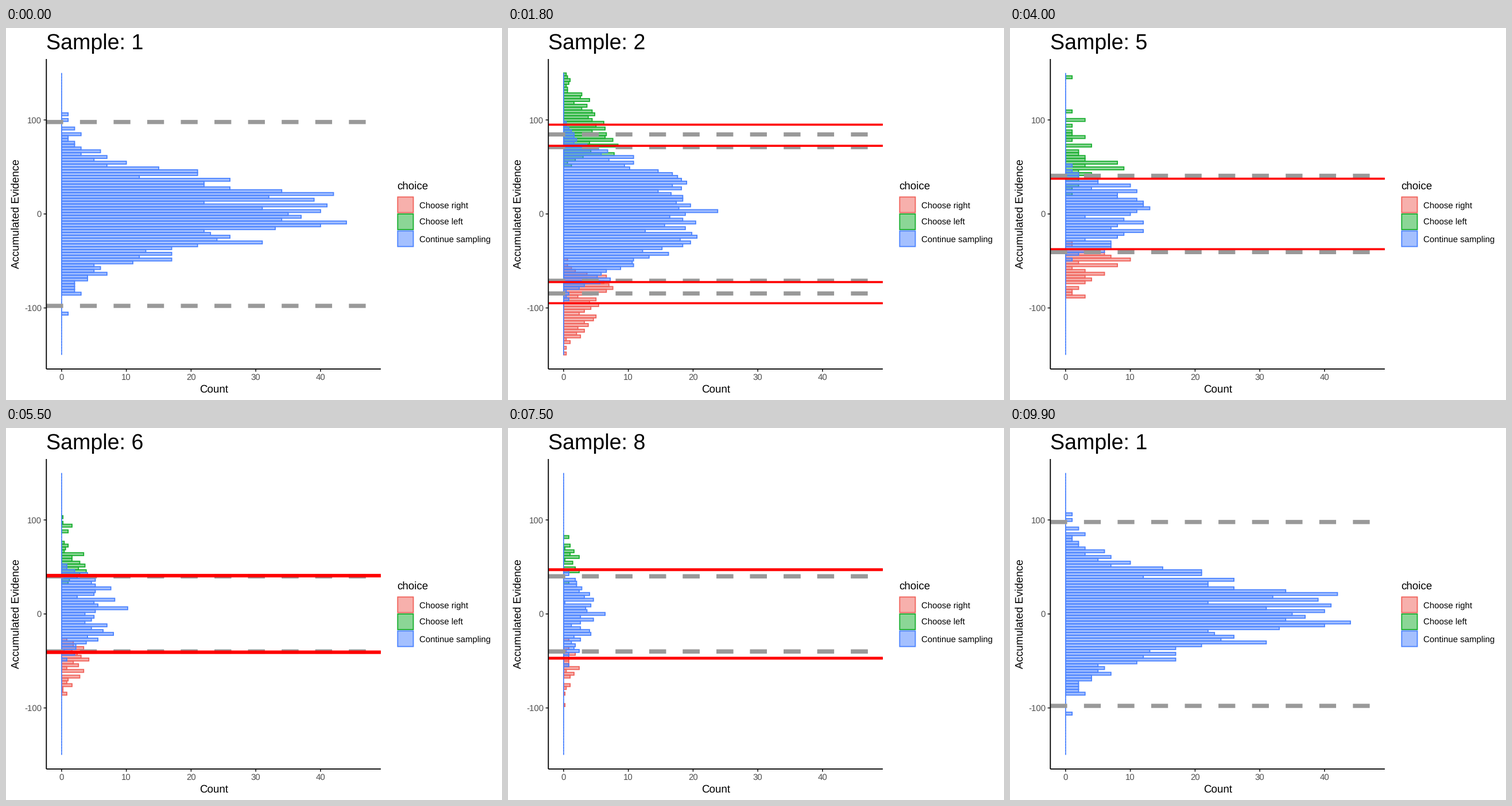
Write a matplotlib script that moves like this. It is 864 px wide and 648 px high and loops after 10 s.

```python
import numpy as np
import matplotlib
import matplotlib.pyplot as plt
from matplotlib.animation import FuncAnimation
from matplotlib.collections import PolyCollection
from matplotlib.colors import to_rgba
from matplotlib.patches import Rectangle

matplotlib.rcParams["font.family"] = "Liberation Sans"
matplotlib.rcParams["text.hinting"] = "none"
matplotlib.rcParams["path.snap"] = False

W, H, DPI = 864, 648, 100
PT = 72 / DPI                       # points per pixel
LEFT, RIGHT, TOP, BOTTOM = 70.3, 652.9, 54, 594
X0, X_UNIT = 96.9, 11.275
Y0, Y_UNIT = 323.9, 1.637
THIN = 1.82

COLORS = {"right": "#F0625A", "left": "#18AE2F", "stay": "#4B83FF"}
LABELS = {"right": "Choose right", "left": "Choose left",
          "stay": "Continue sampling"}

# Evidence model: every trial has its own drift and adds noise per sample.
SAMPLES, TRIALS = 10, 1000
DRIFT_SD, NOISE_SD, BOUND_SD = 22, 23, 8
LIMIT, BINS, MAX_COUNT = 150, 99, 47
EDGES = np.linspace(-LIMIT, LIMIT, BINS + 1)

# Collapsing bound (Weibull shape) and the fitted bound, undefined at first.
GREY = [40 + 60 * np.exp(-(n / 3) ** 3) for n in range(1, SAMPLES + 1)]
RED = [None, 95, 57.5, 45, 37.5, 40, 47.5, 47.5, 43.5, 42.5]

STARTS = [6 + 10 * i - (i > 4) for i in range(SAMPLES)]
TWEEN = 5


def histogram(values):
    return np.minimum(np.histogram(values, EDGES)[0], MAX_COUNT)


def simulate(seed):
    """Histograms of the trials that stop or go on, one dict per sample."""
    rng = np.random.default_rng(seed)
    drift = rng.normal(0, DRIFT_SD, TRIALS)
    x = np.zeros(TRIALS)
    states = []
    for n, bound in enumerate(GREY):
        x = x + drift + rng.normal(0, NOISE_SD, len(x))
        if n == 0:
            states.append({"stay": histogram(x)})
            continue
        go = np.abs(x) < bound + rng.normal(0, BOUND_SD, len(x))
        states.append({"left": histogram(x[~go & (x > 0)]),
                       "right": histogram(x[~go & (x < 0)]),
                       "stay": histogram(x[go])})
        x, drift = x[go], drift[go]
    return states


states = simulate(seed=3)

fig = plt.figure(figsize=(W / DPI, H / DPI), dpi=DPI, facecolor="white")
ax = fig.add_axes([0, 0, 1, 1])
ax.set_xlim(0, W)
ax.set_ylim(H, 0)
ax.axis("off")


def text(x, y, s, px, color="black", **kw):
    return ax.text(x, y, s, fontsize=px * PT, color=color, va="baseline", **kw)


def line(xs, ys, color, px, z=1, **kw):
    return ax.plot(xs, ys, color=color, lw=px * PT, zorder=z,
                   solid_capstyle="butt", dash_capstyle="butt", **kw)[0]


def draw_axes():
    for v in (-100, 0, 100):
        y = Y0 - v * Y_UNIT
        line([LEFT - 4.7, LEFT], [y, y], "#333333", THIN)
        text(62, y + 5.4, str(v), 15.04, "#4D4D4D", ha="right")
    for v in range(0, 50, 10):
        x = X0 + v * X_UNIT
        line([x, x], [BOTTOM, BOTTOM + 4.7], "#333333", THIN)
        text(x, 613.3, str(v), 15.04, "#4D4D4D", ha="center")
    line([LEFT, LEFT], [TOP, BOTTOM], "black", THIN, z=6)
    line([LEFT, RIGHT], [BOTTOM, BOTTOM], "black", THIN, z=6)
    text(361.6, 635.3, "Count", 18.8, ha="center")
    text(23, Y0, "Accumulated Evidence", 18.8, ha="center",
         rotation=90, rotation_mode="anchor")


def draw_legend():
    text(681, 281.3, "choice", 18.8)
    for i, (name, label) in enumerate(LABELS.items()):
        y = 294.4 + 29.53 * i
        ax.add_patch(Rectangle((682.3, y), 27.2, 27.2, lw=THIN * PT,
                               fc=to_rgba(COLORS[name], 0.5),
                               ec=COLORS[name], joinstyle="miter"))
        text(720, y + 19.2, label, 15.04)


def bar_verts(counts, with_empty):
    verts = []
    for count, low, high in zip(counts, EDGES, EDGES[1:]):
        if count > 0 or with_empty:
            x = X0 + count * X_UNIT
            y1, y2 = Y0 - high * Y_UNIT, Y0 - low * Y_UNIT
            verts.append([(X0, y1), (x, y1), (x, y2), (X0, y2)])
    return verts


def bound_pair(color, px, z, **kw):
    return [line([LEFT, RIGHT], [Y0, Y0], color, px, z, **kw) for _ in "+-"]


def place(pair, level):
    for sign, item in zip((1, -1), pair):
        item.set_visible(level is not None)
        if level is not None:
            y = Y0 - sign * level * Y_UNIT
            item.set_ydata([y, y])


def blend(a, b, p, settled):
    """Tween a to b; with one end missing, switch once settled."""
    if a is None or b is None:
        return b if settled else a
    return a + (b - a) * p


draw_axes()
draw_legend()
title = text(LEFT, 37, "", 37.6)

bars = {}
for z, name in enumerate(("left", "right", "stay")):
    bars[name] = PolyCollection(
        [], facecolors=[to_rgba(COLORS[name], 0.5)],
        edgecolors=[COLORS[name]], linewidths=THIN * PT,
        joinstyle="miter", zorder=2 + z * 0.1)
    ax.add_collection(bars[name])

grey_old, grey_now = (bound_pair("#999999", 7.32, 3, ls=(0, (4, 4)))
                      for _ in range(2))
red_old, red_now = (bound_pair("#FF0000", 3.65, 4) for _ in range(2))


def phase(frame):
    """Old state, new state, steps into the change, settling step."""
    i = sum(s <= frame for s in STARTS)
    if i == 0:
        return 0, 0, TWEEN, TWEEN
    return i - 1, i % SAMPLES, frame - STARTS[i - 1] + 1, TWEEN + (i <= 3)


def update(frame):
    old, new, step, settle = phase(frame)
    p = min(step / TWEEN, 1)
    settled = step >= settle

    title.set_text(f"Sample: {(new if step >= 4 else old) + 1}")

    for name, coll in bars.items():
        counts = blend(states[old].get(name), states[new].get(name),
                       p, settled)
        coll.set_visible(counts is not None)
        if counts is not None:
            coll.set_verts(bar_verts(counts, name == "stay"))

    # Bounds of finished trials stay behind until the change has settled.
    place(grey_old, None if settled else GREY[old])
    place(red_old, None if settled else RED[old])
    place(grey_now, blend(GREY[old], GREY[new], p, settled))
    place(red_now, blend(RED[old], RED[new], p, settled))
    return []


anim = FuncAnimation(fig, update, frames=100, interval=100,
                     repeat=True, repeat_delay=0, blit=False)
plt.show()
```
